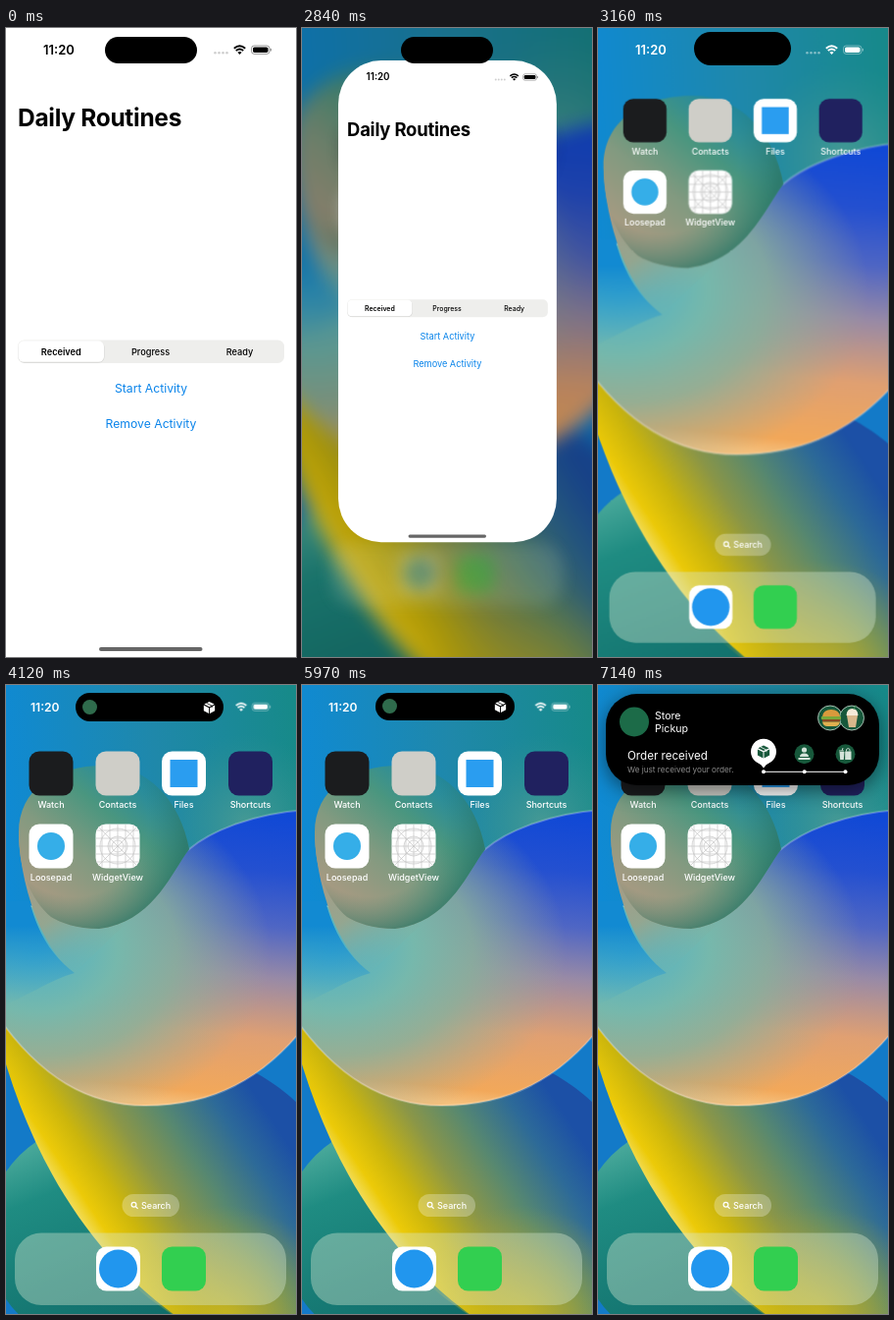
Write an HTML page that moves like this. It is 296 px wide and 640 px high and loops after 8 s.

```html
<!DOCTYPE html>
<html lang="en">
<head>
<meta charset="utf-8">
<title>Phone activity</title>
<style>
html, body { margin: 0; width: 100%; height: 100%; overflow: hidden; background: #1a6f9a; }
#stage { position: relative; width: 296px; height: 640px; overflow: hidden; font-family: Inter, "Liberation Sans", sans-serif; }
#stage > *, .layer { position: absolute; left: 0; top: 0; }
svg { display: block; overflow: visible; }
text { font-family: Inter, "Liberation Sans", sans-serif; }
.mid { text-anchor: middle; }
.anim { animation: 8s step-end infinite; }

#wall { animation-name: wall; transform-origin: 148px 320px; }
#home { animation-name: home; transform-origin: 148px 320px; color: #fff; }
#app { animation-name: app; width: 296px; height: 640px; background: #fff; overflow: hidden; transform-origin: 0 0; }
#start { animation-name: press; }
#icon { animation-name: icon; }
#clock { animation-name: clock; }
#signal { animation-name: signal; }
#dots { animation-name: dots; }
#bar { animation-name: bar; color: #fff; }
#island { animation-name: island; background: #000; overflow: hidden; }
#compact { animation-name: compact; inset: 0; }
#full { animation-name: full; left: 50%; margin-left: -139.5px; }
#compact i { position: absolute; left: 7px; top: 50%; width: 15px; height: 15px; margin-top: -7.5px; border-radius: 50%; background: #2f6b4c; }
#compact svg { position: absolute; right: 8px; top: 50%; margin-top: -7px; }

@keyframes press {
  0%, 100% { opacity: 1; }
  6.25% { opacity: .3; animation-timing-function: linear; }
  11.875% { opacity: 1; }
}
@keyframes app {
  0% { transform: none; border-radius: 0; filter: none; opacity: 1; }
  35.5% { transform: translate(37px, 33px) scale(.753, .766); border-radius: 58px; filter: blur(.7px); opacity: 1; }
  37.125% { transform: translate(77px, 134px) scale(.3, .2); border-radius: 60px / 90px; filter: blur(3px); opacity: .75; }
  39.5%, 100% { transform: translate(92px, 144px) scale(.15, .07); opacity: 0; }
}
@keyframes wall {
  0%, 35.5% { transform: scale(1.18); filter: blur(8px) brightness(.82); }
  37.125% { transform: scale(1.11); filter: blur(3px) brightness(.93); }
  39.5% { transform: scale(1.055); filter: none; }
  44.125%, 100% { transform: none; filter: none; }
}
@keyframes home {
  0%, 35.5% { transform: scale(.86); filter: blur(9px); opacity: .4; }
  37.125% { transform: scale(.94); filter: blur(2px); opacity: .8; }
  39.5% { transform: scale(.982); filter: none; opacity: 1; }
  44.125%, 100% { transform: none; filter: none; opacity: 1; }
}
@keyframes icon {
  0% { opacity: 0; }
  39.5%, 100% { opacity: 1; }
}
@keyframes bar {
  0% { opacity: 0; }
  37.125% { opacity: .6; }
  39.5% { opacity: 1; }
  82.5% { opacity: 1; animation-timing-function: linear; }
  85%, 100% { opacity: 0; }
}
@keyframes clock {
  0% { transform: translate(38px, 26.5px); }
  44.125% { transform: translate(33px, 26.5px) scale(.96); }
  51.5% { transform: translate(25px, 26.5px) scale(.93); }
  62.75% { transform: translate(26px, 26.5px) scale(.93); animation-timing-function: ease-out; }
  74.625%, 100% { transform: translate(27px, 26.5px) scale(.93); }
}
@keyframes signal {
  0% { transform: translate(232px, 22px); }
  44.125% { transform: translate(236px, 22px) scale(.96); }
  51.5% { transform: translate(234px, 22px) scale(.93); }
  62.75% { transform: translate(236px, 22px) scale(.93); animation-timing-function: ease-out; }
  74.625%, 100% { transform: translate(237.5px, 22px) scale(.93); }
}
@keyframes dots {
  0% { opacity: .45; }
  44.125%, 100% { opacity: 0; }
}
@keyframes island {
  0% { left: 101px; top: 8.5px; width: 94px; height: 27.5px; border-radius: 14px; box-shadow: none; }
  39.5% { left: 98px; top: 4px; width: 99px; height: 34px; border-radius: 17px; }
  44.125% { left: 91px; top: 8px; width: 113px; height: 29px; border-radius: 14.5px; }
  51.5% { left: 71px; top: 8px; width: 151px; height: 29px; border-radius: 14.5px; }
  62.75% { left: 74px; top: 8.5px; width: 145px; height: 28px; border-radius: 14px; animation-timing-function: ease-out; }
  74.625% { left: 75px; top: 8.5px; width: 142px; height: 28px; border-radius: 14px; animation-timing-function: linear; }
  80% { left: 72px; top: 8px; width: 148px; height: 30px; border-radius: 15px; animation-timing-function: linear; }
  82.5% { left: 58px; top: 8px; width: 180px; height: 42px; border-radius: 21px; box-shadow: 0 3px 14px rgba(0,0,0,.1); animation-timing-function: linear; }
  84.5% { left: 20px; top: 8px; width: 256px; height: 80px; border-radius: 31px; animation-timing-function: ease-out; }
  86.5% { left: 5px; top: 8px; width: 285px; height: 96px; border-radius: 33px; animation-timing-function: ease-in-out; }
  89.25%, 100% { left: 8px; top: 9px; width: 279px; height: 92.5px; border-radius: 32px; box-shadow: 0 5px 20px rgba(0,0,0,.5); }
}
@keyframes compact {
  0% { opacity: 0; filter: blur(2px); }
  44.125% { opacity: .4; filter: blur(1px); }
  51.5% { opacity: 1; filter: none; }
  80% { opacity: 1; filter: none; animation-timing-function: linear; }
  82.5%, 100% { opacity: 0; filter: blur(3px); }
}
@keyframes full {
  0% { opacity: 0; transform: scale(.75); filter: blur(4px); }
  82.5% { opacity: 0; transform: scale(.75); filter: blur(4px); animation-timing-function: ease-out; }
  87%, 100% { opacity: 1; transform: none; filter: none; }
}
</style>
</head>
<body>
<div id="stage">

<svg id="wall" class="anim" width="296" height="640" viewBox="0 0 296 640">
  <defs>
    <linearGradient id="sky" x1="0" y1=".1" x2="1" y2="0">
      <stop offset="0" stop-color="#0f8ad4"/><stop offset=".5" stop-color="#1f88aa"/><stop offset="1" stop-color="#168a86"/>
    </linearGradient>
    <radialGradient id="glow" gradientUnits="userSpaceOnUse" cx="245" cy="140" r="90">
      <stop offset="0" stop-color="#58a094" stop-opacity=".7"/><stop offset="1" stop-color="#3a9490" stop-opacity="0"/>
    </radialGradient>
    <linearGradient id="teal" x1=".2" y1="0" x2=".6" y2="1">
      <stop offset="0" stop-color="#5ab4a4"/><stop offset=".3" stop-color="#1f8c82"/><stop offset="1" stop-color="#0f6a68"/>
    </linearGradient>
    <linearGradient id="gold" gradientUnits="userSpaceOnUse" x1="60" y1="520" x2="243" y2="399">
      <stop offset="0" stop-color="#f2dc58"/><stop offset=".07" stop-color="#ecca08"/><stop offset=".2" stop-color="#ccb60c"/>
      <stop offset=".4" stop-color="#8a9648"/><stop offset=".6" stop-color="#578870"/><stop offset=".82" stop-color="#2d6a98"/><stop offset="1" stop-color="#1c50a6"/>
    </linearGradient>
    <radialGradient id="olive" gradientUnits="userSpaceOnUse" cx="225" cy="645" r="115">
      <stop offset="0" stop-color="#ccb81c" stop-opacity=".85"/><stop offset="1" stop-color="#b0a830" stop-opacity="0"/>
    </radialGradient>
    <linearGradient id="ball" gradientUnits="userSpaceOnUse" x1="235" y1="125" x2="205" y2="430">
      <stop offset="0" stop-color="#0f48d6"/><stop offset=".2" stop-color="#2450d0"/><stop offset=".38" stop-color="#4f66c4"/>
      <stop offset=".55" stop-color="#988aa6"/><stop offset=".75" stop-color="#e0a072"/><stop offset=".95" stop-color="#f2a85a"/><stop offset="1" stop-color="#f5c07c"/>
    </linearGradient>
    <radialGradient id="mist" gradientUnits="userSpaceOnUse" cx="0" cy="0" r="1" gradientTransform="translate(30 270) scale(240 180)">
      <stop offset="0" stop-color="#4cb2c8"/><stop offset=".35" stop-color="#76b8ac"/><stop offset=".6" stop-color="#88b09c" stop-opacity=".85"/>
      <stop offset="1" stop-color="#98a898" stop-opacity="0"/>
    </radialGradient>
    <linearGradient id="wedge" gradientUnits="userSpaceOnUse" x1="0" y1="245" x2="0" y2="325">
      <stop offset="0" stop-color="#128ad2"/><stop offset="1" stop-color="#2a9cd0" stop-opacity="0"/>
    </linearGradient>
    <linearGradient id="tan" gradientUnits="userSpaceOnUse" x1="25" y1="190" x2="85" y2="290">
      <stop offset="0" stop-color="#a89a84"/><stop offset=".45" stop-color="#94a690"/><stop offset="1" stop-color="#74b4ac" stop-opacity="0"/>
    </linearGradient>
    <linearGradient id="swirl" gradientUnits="userSpaceOnUse" x1="130" y1="85" x2="25" y2="220">
      <stop offset="0" stop-color="#1f89a4"/><stop offset=".3" stop-color="#4a967f"/><stop offset=".6" stop-color="#829a80"/><stop offset="1" stop-color="#ae9a82"/>
    </linearGradient>
    <radialGradient id="shade" gradientUnits="userSpaceOnUse" cx="70" cy="140" r="116">
      <stop offset=".65" stop-color="#3a8470" stop-opacity="0"/><stop offset="1" stop-color="#2c7868" stop-opacity=".85"/>
    </radialGradient>
    <path id="sphere" d="M-10 225H30L187 167C207 150 250 131 306 127V346C262 402 210 428 142 428C85 428 35 400-10 335Z"/>
    <path id="lobe" d="M13 150C13 106 50 82 100 82C145 82 178 118 187 167C168 192 150 241 95 248C75 248 57 243 46 236C26 219 13 190 13 150Z"/>
  </defs>
  <path fill="url(#sky)" d="M-10-10H306V420H-10Z"/>
  <path fill="url(#glow)" d="M120 0H306V250H120Z"/>
  <path fill="#137ac8" d="M-10 335H306V650H-10Z"/>
  <circle cx="95" cy="560" r="115" fill="url(#teal)"/>
  <path id="ribbon" fill="url(#gold)" d="M-10 350C20 470 80 580 185 650H306V434C285 412 262 396 225 380L0 340Z"/>
  <path fill="url(#olive)" d="M110 592Q142 625 185 650H306V520H110Z"/>
  <use href="#sphere" fill="url(#ball)"/>
  <use href="#sphere" fill="url(#mist)" stroke="#fff" stroke-opacity=".25" stroke-width="2"/>
  <path fill="url(#wedge)" d="M-12 220H24C34 258 50 278 70 293C45 300 20 318-12 330Z"/>
  <path fill="url(#tan)" d="M13 150C14 205 38 272 70 293L120 245L60 190Z"/>
  <use href="#lobe" fill="url(#swirl)"/>
  <use href="#lobe" fill="url(#shade)"/>
</svg>

<svg id="home" class="anim" width="296" height="640" viewBox="0 0 296 640">
  <defs>
    <rect id="tile" x="-22.5" y="-22.5" width="45" height="45" rx="10.5"/>
    <symbol id="status" viewBox="0 0 40 10" width="40" height="10" overflow="visible">
      <g fill="none" stroke="currentColor" stroke-width="1.9">
        <path d="M.8 3.2Q6.5-1.8 12.2 3.2M2.8 5.5Q6.5 2.3 10.2 5.5"/>
      </g>
      <path fill="currentColor" d="M4.4 7.2Q6.5 5.6 8.6 7.2L6.5 9.4Z"/>
      <rect x="18.5" y=".5" width="18.5" height="8.4" rx="2.8" fill="none" stroke="currentColor" stroke-opacity=".4"/>
      <rect x="20" y="2" width="15.5" height="5.4" rx="1.6" fill="currentColor"/>
      <path d="M38.3 3.4V6" stroke="currentColor" stroke-opacity=".5"/>
    </symbol>
    <g id="cell" fill="currentColor">
      <circle cx="213.5" cy="25.3" r="1.3"/><circle cx="217.5" cy="25.3" r="1.3"/>
      <circle cx="221.5" cy="25.3" r="1.3"/><circle cx="225.5" cy="25.3" r="1.3"/>
    </g>
    <symbol id="box" viewBox="0 0 14 14" overflow="visible">
      <path fill="currentColor" d="M7 .6L12.6 3.3L7 6.1L1.4 3.3ZM.9 4.4L6.5 7.2V13.4L.9 10.5ZM13.1 4.4L7.5 7.2V13.4L13.1 10.5Z"/>
      <path d="M4 2.1L9.8 5V7.2" fill="none" stroke="var(--cut, #000)" stroke-width=".8"/>
    </symbol>
  </defs>
  <g font-size="9" font-weight="500" fill="#fff" class="mid">
    <g transform="translate(46 90)"><use href="#tile" fill="#1b1c1e"/><text y="35">Watch</text></g>
    <g transform="translate(114 90)"><use href="#tile" fill="#cfcec8"/><text y="35">Contacts</text></g>
    <g transform="translate(181.5 90)"><use href="#tile"/><rect x="-14" y="-14" width="28" height="28" fill="#2a9df0"/><text y="35">Files</text></g>
    <g transform="translate(249.5 90)"><use href="#tile" fill="#20215f"/><text y="35">Shortcuts</text></g>
    <g transform="translate(46 164)"><use href="#tile"/><circle r="14" fill="#35aee8"/><text y="35">Loosepad</text></g>
    <g transform="translate(114 164)">
      <g id="icon" class="anim">
        <use href="#tile"/>
        <g fill="none" stroke="#c4c4c4" stroke-width=".7">
          <path d="M-22-16H22M-22-8H22M-22 0H22M-22 8H22M-22 16H22M-16-22V22M-8-22V22M0-22V22M8-22V22M16-22V22M-20-20L20 20M20-20L-20 20"/>
          <circle r="6"/><circle r="10"/><circle r="18"/>
        </g>
      </g>
      <text y="35">WidgetView</text>
    </g>
  </g>
  <rect x="118.5" y="518" width="58.5" height="23" rx="11.5" fill="#fff" fill-opacity=".28"/>
  <g fill="none" stroke="#fff" stroke-width="1.2"><circle cx="130.5" cy="528.7" r="2.4"/><path d="M132.3 530.5L134.6 532.8"/></g>
  <text x="138" y="532.7" font-size="9" font-weight="500" fill="#fff">Search</text>
  <rect x="9" y="557.5" width="277" height="73.5" rx="27" fill="#d4e6d0" fill-opacity=".4"/>
  <g transform="translate(114.5 594)"><use href="#tile" fill="#fff"/><circle r="19.5" fill="#2196ee"/></g>
  <use href="#tile" x="181.5" y="594" fill="#32cf50"/>
</svg>

<svg id="bar" class="anim" width="296" height="50">
  <g id="clock" class="anim"><text font-size="13" font-weight="600" fill="#fff">11:20</text></g>
  <g id="dots" class="anim"><use href="#cell"/></g>
  <g id="signal" class="anim"><g transform="translate(0 -4.5)"><use href="#status"/></g></g>
</svg>

<div id="app" class="anim">
  <svg width="296" height="640" viewBox="0 0 296 640">
    <text x="38" y="26.5" font-size="13" font-weight="600">11:20</text>
    <use href="#cell" color="#cfcfcf"/>
    <use href="#status" x="232" y="17.5"/>
    <text x="12" y="100.3" font-size="24.5" font-weight="700" letter-spacing="-.3">Daily Routines</text>
    <rect x="12" y="317.5" width="272" height="23.5" rx="6.5" fill="#eeeeec"/>
    <rect x="12.5" y="318.8" width="88" height="22" rx="6" fill="#000" fill-opacity=".1"/>
    <rect x="12.5" y="318.3" width="87.5" height="21.5" rx="5.5" fill="#fff"/>
    <g class="mid" font-size="9.2" font-weight="500">
      <text x="56.3" y="332.5" font-weight="600">Received</text>
      <text x="147.5" y="332.5">Progress</text>
      <text x="238.5" y="332.5">Ready</text>
    </g>
    <g class="mid" font-size="12.2" fill="#0a84ea">
      <text id="start" class="anim" x="148" y="370.5">Start Activity</text>
      <text x="148" y="406.7">Remove Activity</text>
    </g>
    <rect x="95" y="630" width="105.5" height="4" rx="2" fill="#666"/>
  </svg>
</div>

<div id="island" class="anim">
  <div id="compact" class="layer anim">
    <i></i>
    <svg width="13" height="14" color="#fff"><use href="#box" width="13" height="14"/></svg>
  </div>
  <svg id="full" class="layer anim" width="279" height="93" viewBox="8 9 279 93">
    <circle cx="37" cy="37.5" r="15" fill="#1c6b48"/>
    <g fill="#fff">
      <text x="58" y="34.6" font-size="10.6">Store</text>
      <text x="58" y="47.6" font-size="10.6">Pickup</text>
      <text x="30" y="75.6" font-size="11.6">Order received</text>
      <text x="30" y="89.4" font-size="8.2" fill="#8b8b8b">We just received your order.</text>
    </g>
    <g stroke="#cfe3d6" stroke-width=".8" fill="#17583b">
      <circle cx="237" cy="33.5" r="12.5"/><circle cx="259" cy="33.5" r="12.5"/>
    </g>
    <path fill="#d99a3c" d="M229 32Q230 25 238 25Q246 25 247 32Z"/>
    <path fill="#79a83a" d="M228 32H248V35H228Z"/>
    <path fill="#8a4a22" d="M229 35H247V37.5H229Z"/>
    <path fill="#e0b050" d="M229 37.5H247Q246 42 242 42H234Q230 42 229 37.5Z"/>
    <path fill="#d8b88c" d="M254 31H265L263 43H256Z"/>
    <path fill="#f4ead8" d="M253.5 31Q254 24 259.5 24Q265 24 265.5 31Z"/>
    <path stroke="#4b9a62" d="M261 25L263 20.5"/>
    <path d="M169 88.3H252.5" stroke="#fff"/>
    <g fill="#fff"><circle cx="169" cy="88.3" r="2"/><circle cx="210.7" cy="88.3" r="2"/><circle cx="252.5" cy="88.3" r="2"/></g>
    <path fill="#fff" d="M169 84.5Q166.5 80.8 163.5 79.6A13 13 0 1 1 174.5 79.6Q171.5 80.8 169 84.5Z"/>
    <use href="#box" x="162" y="60.5" width="14" height="15" color="#17583b" style="--cut:#fff"/>
    <g fill="#17583b"><circle cx="210.5" cy="70.3" r="10"/><circle cx="252.5" cy="70.3" r="10"/></g>
    <g fill="#d5e3da">
      <circle cx="210.5" cy="66" r="2.6"/><path d="M206 73Q206 69.5 210.5 69.5Q215 69.5 215 73ZM204.5 74H216.5V76H204.5Z"/>
      <path d="M246.5 68H251.5L250.8 76H247.2ZM252.2 67.5H258.5V76H252.2Z"/>
    </g>
    <path d="M253.5 67.5V65.5Q255.3 63.5 257 65.5V67.5M246 67H251M249 67L250 64" fill="none" stroke="#d5e3da" stroke-width=".9"/>
  </svg>
</div>

</div>
</body>
</html>
```
